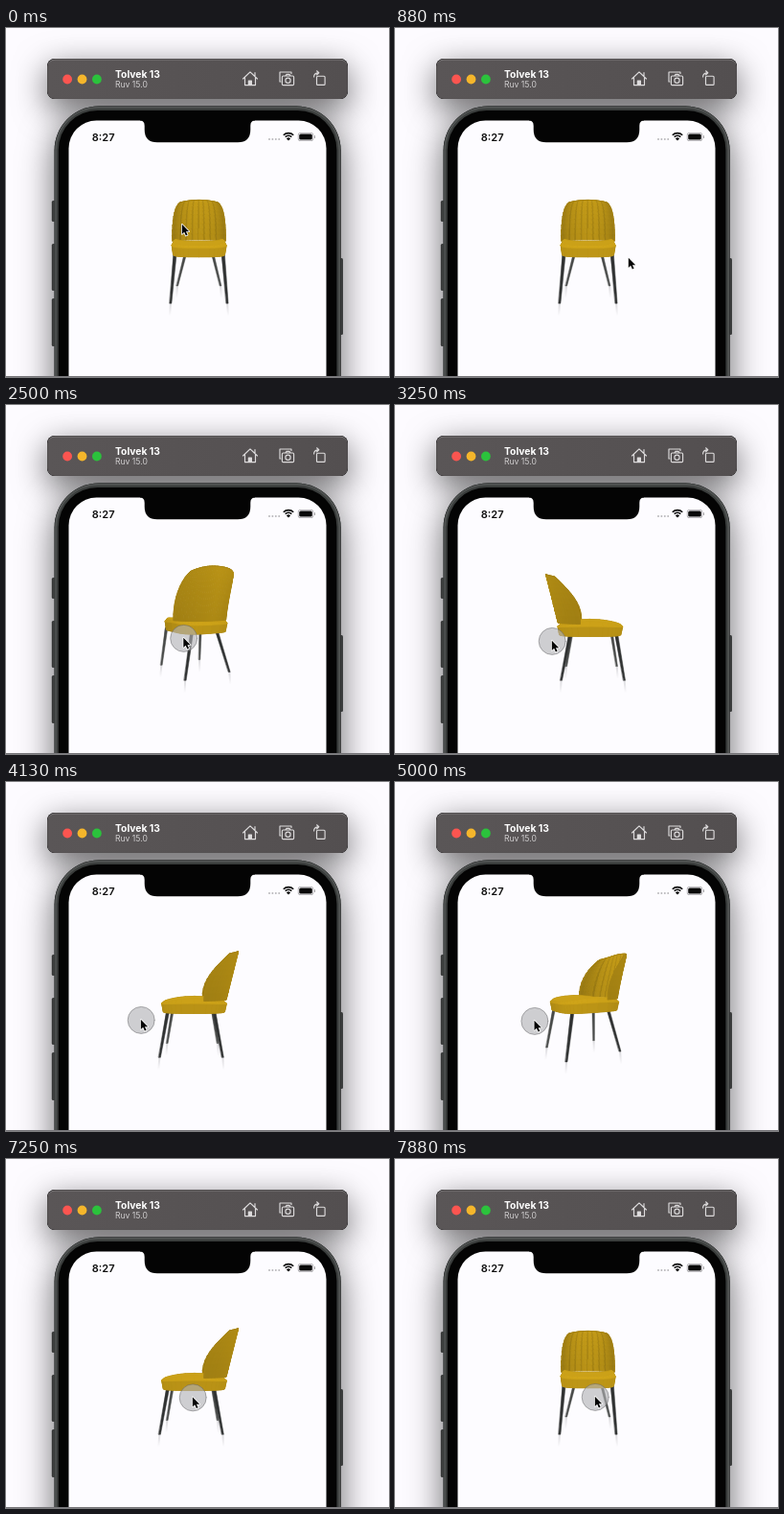
An HTML page with a canvas for the animation above (8000 ms loop, 400 px wide and 364 px high).

```html
<!DOCTYPE html>
<html lang="en">
<head>
<meta charset="utf-8">
<title>Chair viewer</title>
<style>
html, body { margin: 0; width: 100%; height: 100%; overflow: hidden; background: #fdfbff; }
#stage { position: relative; width: 400px; height: 364px; overflow: hidden; }
canvas { position: absolute; left: 0; top: 0; width: 400px; height: 364px; }
span { position: absolute; white-space: nowrap; line-height: 12px; font-family: Inter, Roboto, sans-serif; }
#device { left: 114px; top: 42px; font-size: 10.3px; font-weight: 700; color: #fff; }
#system { left: 114px; top: 53px; font-size: 8.6px; color: #d0cecf; }
#clock { left: 89.8px; top: 107.6px; font-size: 11px; font-weight: 600; color: #0c0c0c; }
</style>
</head>
<body>
<div id="stage">
  <canvas id="view"></canvas>
  <span id="device">Tolvek 13</span>
  <span id="system">Ruv 15.0</span>
  <span id="clock">8:27</span>
</div>
<script>
const LOOP = 8000, STEP = 125, DIST = 226;
const ratio = Math.max(1, window.devicePixelRatio || 1);
const view = document.getElementById('view');
const ctx = setup(view);

function setup(canvas) {
  canvas.width = 400 * ratio;
  canvas.height = 364 * ratio;
  const c = canvas.getContext('2d');
  c.scale(ratio, ratio);
  c.lineJoin = c.lineCap = 'round';
  return c;
}

function box(c, x, y, w, h, r, fill) {
  c.beginPath();
  c.roundRect(x, y, w, h, r);
  c.fillStyle = fill;
  c.fill();
}

function disc(c, x, y, r, fill) {
  c.beginPath();
  c.arc(x, y, r, 0, 7);
  c.fillStyle = fill;
  c.fill();
}

function shadowBox(c, x, y, w, h, r, fill, blur, dy, alpha) {
  c.save();
  c.shadowColor = `rgba(0,0,0,${alpha})`;
  c.shadowBlur = blur * ratio;
  c.shadowOffsetY = dy * ratio;
  box(c, x, y, w, h, r, fill);
  c.restore();
}

function fade(c, x0, y0, x1, y1, ...stops) {
  const g = c.createLinearGradient(x0, y0, x1, y1);
  stops.forEach((s, i) => g.addColorStop(i / (stops.length - 1), s));
  return g;
}

function drawPhone(c) {
  shadowBox(c, 50.6, 81.5, 299, 340, 46, '#2b2d2d', 36, 10, 0.6);
  for (const [y, h] of [[180, 22], [225, 49], [282, 50]])
    box(c, 47.8, y, 4, h, 1.5, fade(c, 47, 0, 52, 0, '#262727', '#555757'));
  box(c, 348.5, 240, 3.5, 80, 1.5, '#3b3d3d');
  box(c, 50.6, 81.5, 299, 340, 46, '#2b2d2d');
  box(c, 51.2, 82.1, 297.8, 340, 45, '#515453');
  box(c, 52.8, 83.8, 294.6, 340, 43.5, '#3a3d3c');
  box(c, 54.8, 86, 290.6, 340, 41, '#040404');
  box(c, 65.5, 96.5, 269, 300, 29, '#fdfcff');
  // notch with small fillets at the top edge
  c.beginPath();
  c.moveTo(140, 95.5);
  c.lineTo(140, 96.5);
  c.quadraticCurveTo(144.7, 96.5, 144.7, 102);
  c.lineTo(144.7, 106);
  c.quadraticCurveTo(144.7, 119.3, 158, 119.3);
  c.lineTo(242, 119.3);
  c.quadraticCurveTo(255.3, 119.3, 255.3, 106);
  c.lineTo(255.3, 102);
  c.quadraticCurveTo(255.3, 96.5, 260, 96.5);
  c.lineTo(260, 95.5);
  c.fillStyle = '#040404';
  c.fill();
}

function drawStatus(c) {
  for (let i = 0; i < 4; i++) disc(c, 275 + i * 3.4, 116, 1, '#b9b8bb');
  c.strokeStyle = '#0c0c0c';
  c.lineCap = 'butt';
  c.lineWidth = 1.6;
  for (const r of [7.4, 4.7]) {
    c.beginPath();
    c.arc(295, 117, r, -Math.PI * 0.75, -Math.PI * 0.25);
    c.stroke();
  }
  c.lineCap = 'round';
  c.beginPath();
  c.moveTo(295, 117.5);
  c.arc(295, 117.5, 3, -Math.PI * 0.75, -Math.PI * 0.25);
  c.fillStyle = '#0c0c0c';
  c.fill();
  box(c, 304.8, 109, 16.4, 9, 2.8, '#aaa9ac');
  box(c, 305.5, 109.7, 15, 7.6, 2.2, '#fdfcff');
  box(c, 306.2, 110.4, 13.6, 6.2, 1.6, '#0a0a0a');
  box(c, 321.8, 112, 1.2, 3, 0.6, '#aaa9ac');
}

function drawBar(c) {
  box(c, 43, 32, 314, 42, 8, '#2e2c2d');
  box(c, 43.6, 32.6, 312.8, 40.8, 7.5, '#7a7778');
  box(c, 43.6, 33.4, 312.8, 40, 7.5, fade(c, 43, 0, 357, 0, '#5a5657', '#534f50'));
  disc(c, 64.1, 53.5, 4.9, '#fb5550');
  disc(c, 79.5, 53.5, 4.9, '#f5b62b');
  disc(c, 94.9, 53.5, 4.9, '#2bc23c');
  c.strokeStyle = '#dddbdc';
  c.lineWidth = 1.15;
  c.stroke(new Path2D('M247.5 53 L255 45.8 L262.5 53 M249.5 51.6 V59.6 H260.5 V51.6 M260 46.5 V50'));
  box(c, 252.8, 54.4, 4.2, 5.2, 0.5, '#dddbdc');
  c.stroke(new Path2D('M287 56 H286 V46 H298 V47.6'));
  c.beginPath();
  c.roundRect(288.4, 50, 12.2, 9.6, 1.2);
  c.moveTo(292, 49.8);
  c.lineTo(293, 48.4);
  c.lineTo(296, 48.4);
  c.lineTo(297, 49.8);
  c.moveTo(297.1, 54.7);
  c.arc(294.5, 54.7, 2.6, 0, 7);
  c.stroke();
  c.beginPath();
  c.roundRect(324.5, 50.2, 8.6, 9.2, 1);
  c.stroke();
  c.stroke(new Path2D('M321.6 51 Q321.6 46.8 326.4 46.8 M324.6 44.8 L326.8 46.8 L324.6 48.8'));
}

const scene = document.createElement('canvas');
const back = setup(scene);
back.fillStyle = '#fdfbff';
back.fillRect(0, 0, 400, 364);
shadowBox(back, 43, 32, 314, 42, 8, '#2e2c2d', 34, 10, 0.6);
drawPhone(back);
drawStatus(back);
drawBar(back);
back.fillStyle = '#77767a';
back.fillRect(0, 363, 400, 1);

// ---- chair model: x sideways, y down from eye level, z forward ----
const grid = (n, f) => Array.from({ length: n + 1 }, (_, i) => f(i / n));
const COLS = 36, ROWS = 10;

function shellPoint(u, v) {
  const a = Math.abs(u);
  return [
    (28.5 - 4.2 * v ** 4 - 1.5 * v ** 16) * u * (1.2 - 0.2 * u * u),
    13 - v * (48.5 - 4.5 * a * a),
    -29 - 12 * v + (23 + 14 * v - 26 * v * v) * a ** 3
  ];
}
const shell = grid(COLS, i => grid(ROWS, j => shellPoint(2 * i - 1, 1 - (1 - j) ** 1.4)));

// Seat rings dip by `sag` towards the front and rear
const soft = (s, p) => Math.sign(s) * Math.abs(s) ** p;
const ring = (y, k, sag = 0) => grid(40, i => {
  const a = i * Math.PI * 2, c = soft(Math.cos(a), 0.55);
  return [26.5 * k * soft(Math.sin(a), 0.55), y + sag * c * c, 3.5 + 32.5 * k * c];
});
const seatTop = ring(11, 0.93, 3.5), seatRim = ring(15.5, 1, 1.2), seatLow = ring(24.8, 0.95);

const legs = [];
for (const side of [-1, 1]) {
  legs.push([[22 * side, 23, 28], [25 * side, 65.6, 35.2]]);
  legs.push([[14 * side, 23, -16], [25 * side, 65.6, -23.5]]);
}

function camera(angle) {
  const cos = Math.cos(angle), sin = Math.sin(angle);
  const cx = 200 + 1.5 * cos, cy = 213.5 - 4 * cos * cos;
  return ([x, y, z]) => {
    const d = z * cos - x * sin, s = DIST / (DIST - d);
    return { x: cx + (x * cos + z * sin) * s, y: cy + y * s, d, s };
  };
}

function paint(pts, color, line = 0.5) {
  ctx.beginPath();
  pts.forEach(p => ctx.lineTo(p.x, p.y));
  ctx.closePath();
  ctx.fillStyle = ctx.strokeStyle = color;
  ctx.lineWidth = line;
  ctx.fill();
  ctx.stroke();
}

const tint = k => `rgb(${198 * k | 0},${157 * k | 0},${24 * k | 0})`;
const area = p => p.reduce((sum, a, i) => {
  const b = p[(i + 1) % p.length];
  return sum + a.x * b.y - b.x * a.y;
}, 0);
const lerp = (a, b, k) => a + (b - a) * k;

function drawLegs(cam) {
  const items = legs.map(l => l.map(cam)).sort((a, b) => a[1].d - b[1].d);
  for (const [, f] of items) {
    ctx.strokeStyle = fade(ctx, 0, f.y, 0, f.y + 13, 'rgba(90,90,95,.22)', 'rgba(90,90,95,0)');
    ctx.lineWidth = 2;
    ctx.beginPath();
    ctx.moveTo(f.x, f.y);
    ctx.lineTo(f.x + (f.x - 200) * 0.03, f.y + 13);
    ctx.stroke();
  }
  for (const [t, f] of items) {
    const a = 1.5 * t.s, b = 0.85 * f.s;
    paint([{ x: t.x - a, y: t.y }, { x: t.x + a, y: t.y }, { x: f.x + b, y: f.y }, { x: f.x - b, y: f.y }],
      f.d > 0 ? '#303232' : '#484a49');
  }
}

function drawSeat(cam) {
  const top = seatTop.map(cam), rim = seatRim.map(cam), low = seatLow.map(cam);
  const band = (a, b, k) => {
    const quads = [];
    for (let i = 0; i < 40; i++) quads.push([a[i], a[i + 1], b[i + 1], b[i]]);
    quads.sort((p, q) => p[0].d + p[1].d - q[0].d - q[1].d);
    for (const q of quads) paint(q, tint(k + Math.max(-0.06, q[0].d / 400)), 0.8);
  };
  paint(low, tint(0.78));
  band(rim, low, 0.87);
  band(top, rim, 0.97);
  paint(top, tint(1.03));
}

function shellFaces(cam) {
  const p = shell.map(col => col.map(cam)), faces = [];
  for (let i = 0; i < COLS; i++) for (let j = 0; j < ROWS; j++) {
    const q = [p[i][j], p[i + 1][j], p[i + 1][j + 1], p[i][j + 1]];
    const u = Math.abs((i + 0.5) / COLS * 2 - 1), v = j / ROWS;
    const inner = area(q) < 0;
    let k = inner ? 1 - 0.18 * u ** 3 : 0.95 - 0.07 * u;
    if (inner && u < 0.85 && i % 4 === 1) k -= 0.1;
    k -= (1 - v) * 0.07;
    const edges = [];
    if (i === 0) edges.push([q[0], q[3]]);
    if (i === COLS - 1) edges.push([q[1], q[2]]);
    if (j === ROWS - 1) edges.push([q[2], q[3]]);
    faces.push({ q, k, edges, d: (q[0].d + q[2].d) / 2 });
  }
  return faces.sort((a, b) => a.d - b.d);
}

function drawShell(faces) {
  for (const f of faces) {
    paint(f.q, tint(f.k), 1);
    ctx.strokeStyle = tint(0.84);
    ctx.lineWidth = 1;
    for (const [a, b] of f.edges) {
      ctx.beginPath();
      ctx.moveTo(a.x, a.y);
      ctx.lineTo(b.x, b.y);
      ctx.stroke();
    }
  }
}

function drawChair(angle) {
  const cam = camera(angle), faces = shellFaces(cam);
  drawLegs(cam);
  drawShell(faces.filter(f => f.d <= 0));
  drawSeat(cam);
  drawShell(faces.filter(f => f.d > 0));
}

// ---- pointer and drag ----
const PRESS = 1500;
const path = [
  [0, 183, 204], [250, 205, 212], [500, 262, 232], [625, 270, 238], [875, 243, 239],
  [1375, 212, 239], [1750, 206, 239], [3250, 163, 245], [4125, 140, 247], [4600, 133, 248],
  [5250, 152, 248], [5875, 164, 247.5], [7250, 194, 247.5], [7875, 208, 247]
];
const turns = [[130, -525], [140, -450], [163.5, -270], [194, -90], [206, 0]];

function sample(keys, at, col) {
  if (at <= keys[0][0]) return keys[0][col];
  for (let i = 1; i < keys.length; i++) {
    const a = keys[i - 1], b = keys[i];
    if (at <= b[0]) return lerp(a[col], b[col], (at - a[0]) / (b[0] - a[0]));
  }
  return keys[keys.length - 1][col];
}

const arrow = new Path2D('M0 0 V11.6 L2.7 9.1 L4.6 13.4 L6.6 12.5 L4.7 8.4 H8.4 Z');

function drawPointer(x, y, pressed) {
  if (pressed) {
    disc(ctx, x + 1.2, y + 1.4, 14, 'rgba(178,177,181,.62)');
    ctx.strokeStyle = 'rgba(95,95,98,.6)';
    ctx.lineWidth = 0.8;
    ctx.stroke();
  }
  ctx.save();
  ctx.translate(x + 0.8, y + 0.8);
  ctx.scale(0.88, 0.88);
  ctx.strokeStyle = '#fff';
  ctx.lineWidth = 1.8;
  ctx.stroke(arrow);
  ctx.fillStyle = '#050505';
  ctx.fill(arrow);
  ctx.restore();
}

function render(now) {
  const t = Math.floor((now % LOOP) / STEP) * STEP;
  const x = sample(path, t, 1), y = sample(path, t, 2);
  const pressed = t >= PRESS;
  const deg = pressed ? Math.round(sample(turns, x, 1) / 15) * 15 : 0;
  ctx.drawImage(scene, 0, 0, 400, 364);
  drawChair(deg * Math.PI / 180);
  drawPointer(x, y, pressed);
}

const start = performance.now();
function tick() {
  render(performance.now() - start);
  requestAnimationFrame(tick);
}
tick();
</script>
</body>
</html>
```
